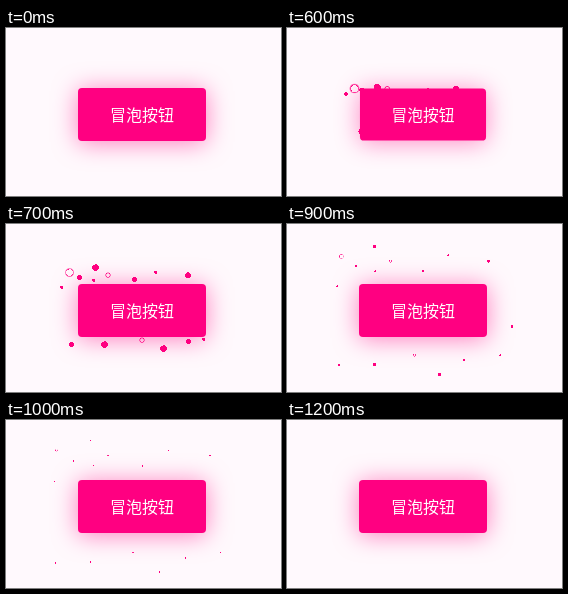
Write an HTML page that moves like this. It is 275 by 168 pixels and loops after 1600 ms.

```html
<!DOCTYPE html>
<html lang="zh">
<head>
<meta charset="utf-8">
<title>冒泡按钮</title>
<style>
  :root { --pink: #ff0081; }
  html, body {
    margin: 0;
    width: 100%;
    height: 100%;
    overflow: hidden;
    background: #fff9fd;
  }
  .stage {
    position: absolute;
    left: 72px;
    top: 60px;
    width: 128px;
    height: 53px;
  }
  .button {
    position: absolute;
    inset: 0;
    box-sizing: border-box;
    padding: 16px 0;
    border-radius: 4px;
    background: var(--pink);
    box-shadow: 0 2px 25px rgba(255, 0, 130, 0.5);
    color: #fff;
    font: 16px/21px "Noto Sans CJK SC", "Noto Sans CJK", sans-serif;
    text-align: center;
    white-space: nowrap;
  }
  .small { transform: scale(0.985); }
  .small .button { box-shadow: 0 2px 25px rgba(255, 0, 130, 0.45); }
  .pressed .button { background: #e60074; }

  .bubbles {
    position: absolute;
    left: -20%;
    width: 140%;
    height: 100%;
    visibility: hidden;
    background-repeat: no-repeat;
  }
  .bubbling .bubbles { visibility: visible; }
  .above { top: -75%; }
  .below { bottom: -75%; }
</style>
</head>
<body>
<div class="stage">
  <div class="bubbles above"></div>
  <div class="bubbles below"></div>
  <div class="button">冒泡按钮</div>
</div>
<script>
  const LOOP = 1600, STEP = 100;
  const PRESS = 500, RELEASE = 600, END = 1200;
  const LAUNCH = 508, FLIGHT = 750;
  const stage = document.querySelector('.stage');

  // A bubble has a size and the point it reaches halfway, all in percent.
  const bubble = stops => (size, x, y) =>
    ({ image: `radial-gradient(circle, ${stops})`, size, x, y });
  const dot = bubble('var(--pink) 20%, transparent 20%');
  const ring = bubble('transparent 20%, var(--pink) 20%, transparent 30%');
  const thinRing = bubble('transparent 10%, var(--pink) 15%, transparent 20%');

  const above = [
    dot(10, 0, 80), ring(20, 0, 20), dot(15, 10, 40),
    dot(20, 20, 0), thinRing(18, 30, 30), dot(10, 22, 50),
    dot(15, 50, 50), dot(10, 65, 20), dot(18, 90, 30)
  ];
  const below = [
    dot(15, 0, 80), dot(20, 20, 80), thinRing(18, 45, 60), dot(20, 60, 100),
    dot(15, 75, 70), dot(10, 95, 60), dot(20, 105, 0)
  ];

  // Bubbles leave the button's edge, spread out, then drift on by 10% while shrinking.
  function launch(selector, bubbles, startX, startY, drift) {
    const layer = stage.querySelector(selector);
    const list = f => bubbles.map(f).join();
    const easing = 'ease-in-out';
    layer.style.backgroundImage = list(b => b.image);
    const flight = layer.animate([
      {
        easing,
        backgroundPosition: list(b => `${startX(b.x)}% ${startY}%`),
        backgroundSize: list(b => `${b.size}% ${b.size}%`)
      },
      { easing, offset: 0.5, backgroundPosition: list(b => `${b.x}% ${b.y}%`) },
      {
        backgroundPosition: list(b => `${b.x}% ${b.y + drift}%`),
        backgroundSize: list(() => '0% 0%')
      }
    ], { duration: FLIGHT, fill: 'both' });
    flight.pause();
    return flight;
  }

  const flights = [
    launch('.above', above, x => 2 + 0.76 * x, 90, -10),
    launch('.below', below, x => Math.min(x + 10, 175 - x), -10, 10)
  ];

  function draw(t) {
    const bubbling = t >= RELEASE && t < END;
    stage.classList.toggle('pressed', t === PRESS);
    stage.classList.toggle('small', t === PRESS || t === RELEASE);
    stage.classList.toggle('bubbling', bubbling);
    for (const f of flights) f.currentTime = bubbling ? t - LAUNCH : 0;
  }

  const start = performance.now();
  let shown = -1;

  function tick() {
    const elapsed = (performance.now() - start) % LOOP;
    const t = Math.floor(elapsed / STEP) * STEP;
    if (t !== shown) draw(shown = t);
    requestAnimationFrame(tick);
  }
  tick();
</script>
</body>
</html>
```
